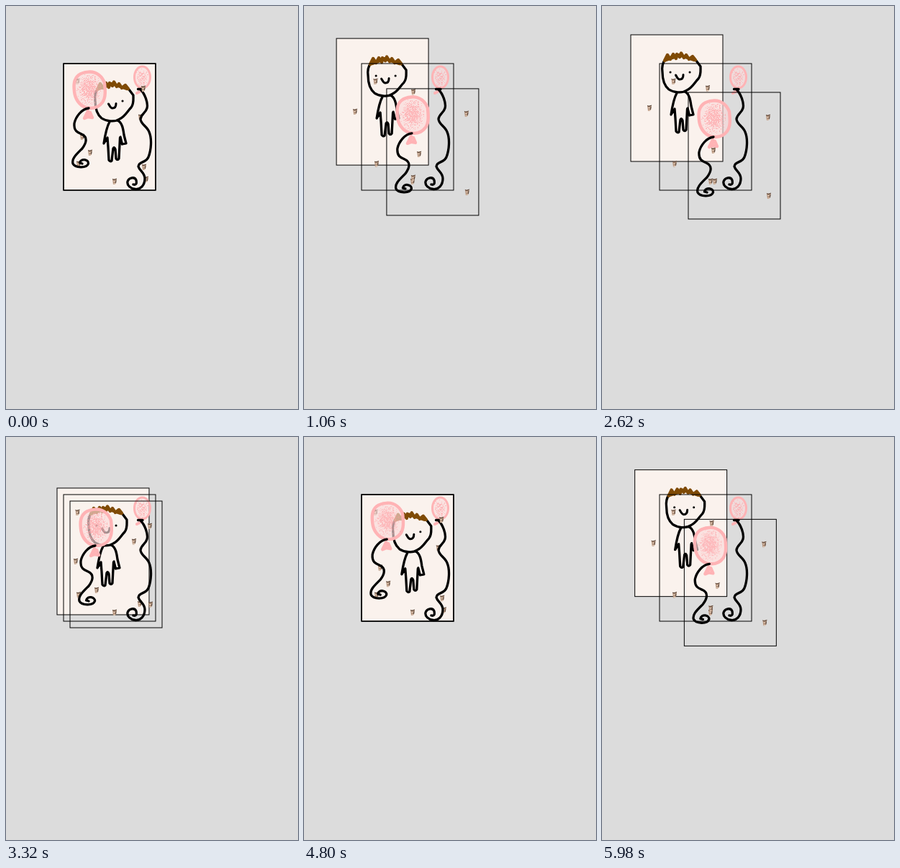
An HTML page for the animation above (6000 ms loop, 406 by 560 pixels).

```html
<!DOCTYPE html>
<html lang="en">
<head>
<meta charset="utf-8">
<title>Layered drawing</title>
<style>
  html, body { margin: 0; width: 100%; height: 100%; overflow: hidden; background: #dcdcdc; }
  svg { display: block; width: 406px; height: 560px; }
  .card { fill: none; stroke: #000; stroke-width: 1; }
  .paper { fill: #faf2ed; }
  .ink, .hair, .pink { fill: none; stroke-linecap: round; stroke-linejoin: round; }
  .ink { stroke: #000; stroke-width: 3.3; }
  .hair { stroke: #7f4a04; stroke-width: 4.4; }
  .pink { stroke: #ffb3b5; stroke-width: 4.4; }
  .film { fill: #fbdada; opacity: .65; }
  .spray { fill: #ff9ea3; opacity: .6; }
</style>
</head>
<body>
<svg viewBox="0 0 406 560">
  <defs>
    <rect id="frame" x="80" y="80" width="128" height="176"/>
    <g id="mark">
      <path d="M-3-3.5L3-4L2 2L.5 4H-2L-2.5 0Z" fill="#b3937c"/>
      <path d="M-3-3.5L-1-2.500L3-4M2-2L1.500 2" fill="none" stroke="#54433a"/>
      <path d="M-1.500-.5H.5M-1.500 3H1" stroke="#efd9c8"/>
    </g>
  </defs>

  <g id="back">
    <use href="#frame" class="card paper"/>
    <path class="ink" d="M128 114C124 119 123 125 124 132C124 143 127 151 133 156C139 160 151 162 158 157C166 153 168 147 174 141C178 136 177 130 177 124L171 116"/>
    <path class="ink" d="M142.500 136C144 138 145 142 148 142C152 142 153 139 153 135.500M135 132h.1M162 132h.1" style="stroke-width:3"/>
    <path class="ink" d="M144 161C140 168 138 178 136 191L141 183L142 196L143 214Q145 217 147 215L149 198Q150.500 195 152 199L153 212Q155 215 157 212L158.500 183M155 159C162 162 163 172 164 179L167 191L161.500 192L159 182"/>
    <path class="hair" d="M127 116L131 108L135 114L139 107L143 113L144 107L148 111L150 105.500L154 112L157 108L161 114L166 110L170 115M129 115L138 112L147 108L156 111L168 115"/>
  </g>

  <g id="middle">
    <use href="#frame" class="card"/>
    <ellipse class="film" cx="189.500" cy="99" rx="11" ry="14.500"/>
    <path id="smallSpray" class="spray"/>
    <ellipse class="pink" cx="189.500" cy="99" rx="11" ry="15" style="stroke-width:3"/>
    <path class="pink" d="M182 121L186 119" style="stroke-width:4"/>
    <path class="ink" d="M183.500 115.500H190M187 116C193 122 198 135 196 142C194 149 188 150 187 157C187 164 196 167 199 175C203 184 202 200 198 210C194 219 185 215 184 223C186 230 193 231 193 240C193 249 187 255 180 254.500C173 254 168 249 169 244C171 238 179 237 181 242C182 247 181 249 177 248"/>
  </g>

  <g id="front">
    <use href="#frame" class="card"/>
    <ellipse class="film" cx="116" cy="117" rx="21" ry="25"/>
    <path id="bigSpray" class="spray"/>
    <path class="pink" d="M116 91.500C126 91 134 98 137 107C138 117 139 127 134 134C128 142 119 143 111 141C102 138 96 129 95 119C94 110 94 102 101 96C106 92 111 92 116 91.500Z"/>
    <path class="pink" d="M114 146L109 156L114 154L120 155L117 148L113 151"/>
    <path class="ink" d="M115 142C105 143 97 154 95 163C94 174 100 176 105 178C114 182 112 190 106 198C98 206 91 212 93 219C96 225 112 226 114.500 219C115 213 104 211 102.500 218L106 219"/>
  </g>
</svg>
<script>
  const SVG = 'http://www.w3.org/2000/svg';
  const LOOP = 6000, HALF = 2480, DELAY = 268, RATE = 0.0026, REACH = 40;
  const el = id => document.getElementById(id);

  const marks = {
    back: [[106, 182], [187, 154.5], [195, 241]],
    middle: [[99.5, 105], [101, 219.5], [151, 244]],
    front: [[191, 115], [192, 224], [117, 204]]
  };
  for (const [layer, spots] of Object.entries(marks)) {
    for (const [x, y] of spots) {
      const use = document.createElementNS(SVG, 'use');
      use.setAttribute('href', '#mark');
      use.setAttribute('transform', `translate(${x} ${y})`);
      el(layer).append(use);
    }
  }

  let seed = 90210;
  const random = () => (seed = seed * 48271 % 2147483647) / 2147483647;
  const bell = () => (random() + random() + random()) / 1.5 - 1;

  // Dots gather at the centre and thin out towards the rim.
  function spray(id, cx, cy, rx, ry, count) {
    let d = '';
    for (let i = 0; i < count; i++) {
      const x = bell(), y = bell();
      if (x * x + y * y > 0.8) continue;
      d += `M${Math.round(cx + rx * x)} ${Math.round(cy + ry * y)}h1v1h-1z`;
    }
    el(id).setAttribute('d', d);
  }
  spray('bigSpray', 115, 115, 20, 25, 800);
  spray('smallSpray', 189, 99, 12, 16, 150);

  // Pause, then ease exponentially towards the other end.
  function spread(t) {
    const left = Math.exp(-RATE * Math.max(0, t % HALF - DELAY));
    return REACH * (Math.floor(t / HALF) % 2 ? left : 1 - left);
  }

  const start = performance.now();
  function draw() {
    const d = spread((performance.now() - start) % LOOP);
    el('back').setAttribute('transform', `translate(${-d} ${-d})`);
    el('front').setAttribute('transform', `translate(${d} ${d})`);
    requestAnimationFrame(draw);
  }
  draw();
</script>
</body>
</html>
```
